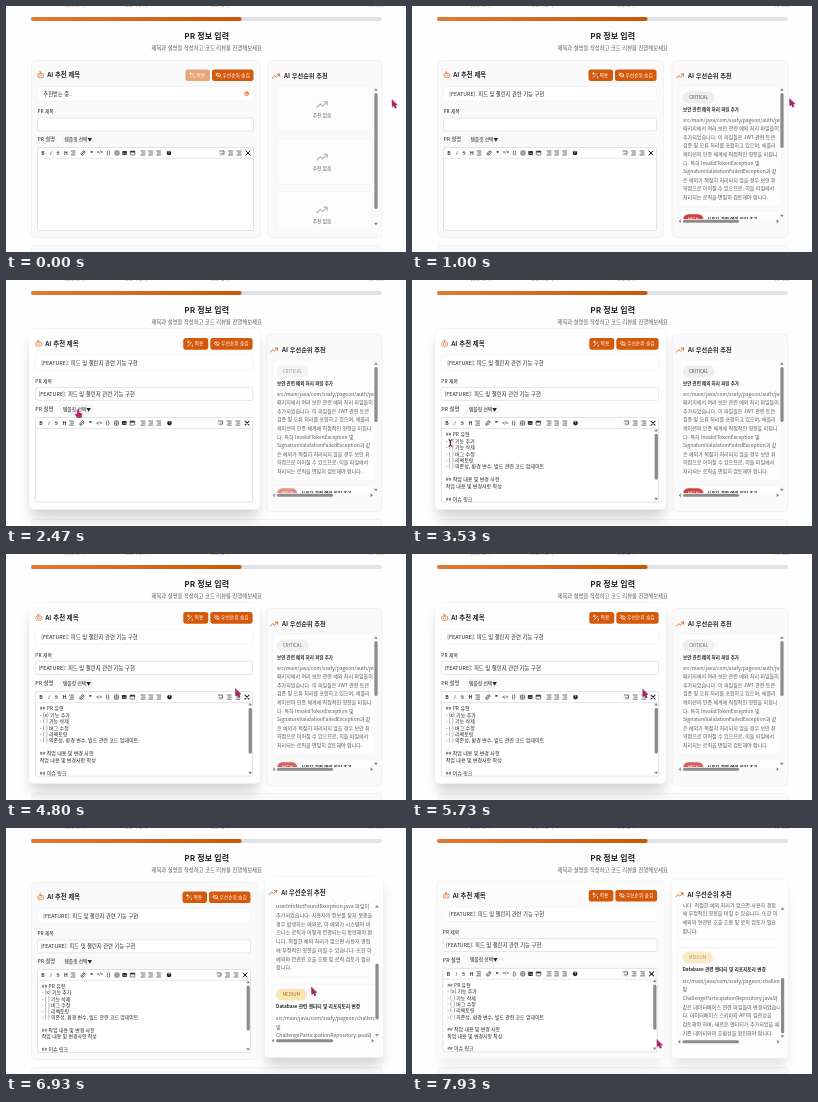
Animation of 400x246 px, one loop 8000 ms. Source, as an HTML page:

```html
<!DOCTYPE html>
<html lang="ko">
<head>
<meta charset="utf-8">
<style>
  html, body { margin: 0; width: 100%; height: 100%; overflow: hidden; background: #fefefe; }
  svg { display: block; width: 400px; height: 246px; }
  text { font-family: "Noto Sans CJK KR", "Noto Sans CJK", "Noto Sans", sans-serif; white-space: pre; }
</style>
</head>
<body>
<svg id="stage" viewBox="0 0 400 246">
  <defs>
    <linearGradient id="progress"><stop stop-color="#e07b32"/><stop offset="1" stop-color="#c9570d"/></linearGradient>
    <filter id="blur" x="-25%" y="-25%" width="150%" height="150%"><feGaussianBlur stdDeviation="6"/></filter>
    <clipPath id="tallView"><rect x="264" y="78" width="103.5" height="143"/></clipPath>
    <clipPath id="shortView"><rect x="264" y="78" width="103.5" height="135"/></clipPath>
  </defs>
</svg>
<script>
const LOOP = 8000, MID_Y = 143;
const LOADED = 600, TITLE_APPLIED = 1830, TEMPLATE_APPLIED = 2500, BOX_CHECKED = 3950;
const ORANGE = '#d4590b', INK = '#27272a', GREY = '#5c5c64', BAR = '#8b8b8b';
const SUGGESTION = '[FEATURE]: 피드 및 챌린지 관련 기능 구현';
const stage = document.getElementById('stage');

function el(parent, tag, attrs = {}) {
  const node = document.createElementNS('http://www.w3.org/2000/svg', tag);
  for (const key in attrs) node.setAttribute(key, attrs[key]);
  return parent.appendChild(node);
}
const group = (parent, attrs) => el(parent, 'g', attrs);
const rect = (parent, x, y, width, height, fill, rx = 0, stroke = 'none') =>
  el(parent, 'rect', { x, y, width, height, fill, rx, stroke, 'stroke-width': .6 });
const path = (parent, d, stroke, width = .8, fill = 'none') =>
  el(parent, 'path', { d, stroke, fill, 'stroke-width': width, 'stroke-linecap': 'round', 'stroke-linejoin': 'round' });
// y is the vertical middle of the glyphs
function text(parent, x, y, size, string, fill = INK, weight = 400, anchor = 'start') {
  const node = el(parent, 'text', { x, y: y + size * .36, 'font-size': size, fill, 'font-weight': weight, 'text-anchor': anchor });
  node.textContent = string;
  return node;
}
const show = (node, visible) => node.setAttribute('display', visible ? 'inline' : 'none');

const clamp = v => Math.max(0, Math.min(1, v));
const smooth = v => { v = clamp(v); return v * v * (3 - 2 * v); };
// keys: [time, value, value...], eased between neighbours
function at(keys, t) {
  const next = keys.findIndex(k => k[0] > t);
  if (next < 0) return keys[keys.length - 1].slice(1);
  if (next === 0) return keys[0].slice(1);
  const a = keys[next - 1], b = keys[next], p = smooth((t - a[0]) / (b[0] - a[0]));
  return a.slice(1).map((v, i) => v + (b[i + 1] - v) * p);
}

function trend(parent, x, y, color, scale) {
  const g = group(parent, { transform: `translate(${x} ${y}) scale(${scale})` });
  path(g, 'M-4 2.2L-1.3 -.4L.5 1.3L4 -2.2M1.5 -2.2H4V.3', color, .9);
}

// Vertical scroll bar between two arrow heads; returns the thumb
function scrollbar(parent, x, top, bottom, thumbLength) {
  path(parent, `M${x - 1.3} ${top}h2.6l-1.3 -1.8zM${x - 1.3} ${bottom}h2.6l-1.3 1.8z`, '#777', .4, '#777');
  return rect(parent, x - 1.6, top + 2.5, 3.2, thumbLength, BAR, 1.6);
}

function card(parent, x, width) {
  const root = group(parent);
  const shadow = rect(root, x + 2, 66, width - 4, 174, '#000', 5);
  shadow.setAttribute('filter', 'url(#blur)');
  rect(root, x, 54.5, width, 177, '#fafafa', 4, '#ededef');
  const lift = rect(root, x, 54.5, width, 177, '#fff', 4);
  return {
    root,
    hover(h) {
      const cx = x + width / 2;
      root.setAttribute('transform', `translate(${cx} ${MID_Y - 4 * h}) scale(${1 + .02 * h}) translate(${-cx} ${-MID_Y})`);
      shadow.setAttribute('opacity', .17 * h);
      lift.setAttribute('opacity', .85 * h);
    }
  };
}

function toolbar(parent, right) {
  const y = 147, dark = '#333';
  [['B', 37, 700], ['I', 44.5, 400], ['S', 52, 400], ['H', 60, 700], ['❞', 85.5, 700], ['</>', 94, 700], ['{}', 102.5, 700]]
    .forEach(([glyph, x, weight]) => {
      const node = text(parent, x, y, glyph === '</>' ? 4 : 5, glyph, dark, weight, 'middle');
      if (glyph === 'I') node.setAttribute('font-style', 'italic');
      if (glyph === 'S') node.setAttribute('text-decoration', 'line-through');
    });
  path(parent, 'M75.5 148.5L78.7 145.3M76.5 145.7L78 144.7L79.3 146L78.4 147.4M77.7 148.4L76 149.4L74.8 148L75.7 146.6', dark, .7);
  for (const x of [67, 137, 144.5, 152.5, right - 23, right - 14.5])
    path(parent, `M${x - 2} 145h4m-3 2h3m-4 2h4`, dark, .7);
  rect(parent, right - 34.5, 144, 6, 6, '#ececec', 1);
  path(parent, `M${right - 33.5} 145h4v3h-3`, dark, .6);
  rect(parent, 109, 145, 4, 4, 'none', .4, dark);
  path(parent, 'M109 147h4m-2 -2v4', dark, .5);
  rect(parent, 116.3, 145, 4.6, 4, dark, .5);
  path(parent, 'M117 148.3l1.2 -1.5l1 1l.7 -.6l.6 1.1', '#fff', .4);
  rect(parent, 124.3, 145, 4.6, 4, 'none', .4, dark);
  rect(parent, 124.3, 145, 4.6, 1.5, dark);
  el(parent, 'circle', { cx: 163, cy: y, r: 2.3, fill: '#222' });
  text(parent, 163, y, 3.6, '?', '#fff', 700, 'middle');
  path(parent, `M${right - 7.5} 145l4 4m0 -4l-4 4`, '#222', 1);
}

function leftCard(width, loaded) {
  const c = card(stage, 25.5, width), g = c.root, right = 25.5 + width - 7, inner = right - 31.5;
  rect(g, 32, 67.6, 5.6, 4, 'none', 1, ORANGE);
  path(g, 'M34.8 67.6v-1.7h-1.2M33.8 69.2v.7M35.8 69.2v.7', ORANGE, .7);
  text(g, 41.2, 69, 6.3, 'AI 추천 제목', INK, 700);

  const apply = rect(g, right - 68, 63.5, 24.5, 11.5, loaded ? ORANGE : '#e7a579', 2.5);
  path(g, `M${right - 63.5} 71.5l3.8 -3.8M${right - 63} 66.5v2m-1 -1h2M${right - 59.2} 70.3v1.6`, '#fff', .7);
  text(g, right - 57, 69.2, 4.7, '적용', '#fff', 500);
  rect(g, right - 41.5, 63.5, 41.5, 11.5, ORANGE, 2.5);
  path(g, `M${right - 37.5} 69q2.5 -3.4 5 0q-2.5 3.4 -5 0M${right - 37.3} 66.7l4.6 4.7`, '#fff', .7);
  text(g, right - 31, 69.2, 4.7, '우선순위 숨김', '#fff', 500);

  rect(g, 31.5, 80.5, inner, 14.5, '#fff', 2.5, '#f1f1f2');
  text(g, 37.3, 87.8, 5.3, loaded ? SUGGESTION : '추천받는 중..');
  let spinner;
  if (!loaded) {
    el(g, 'circle', { cx: 240.5, cy: 87.8, r: 2, fill: '#f3b78c', stroke: '#ee9a62', 'stroke-width': .9 });
    spinner = path(g, 'M240.5 85.8a2 2 0 0 1 2 2', ORANGE, .9);
  }
  text(g, 31.5, 105.7, 4.8, 'PR 제목', INK, 500);
  rect(g, 31.5, 112, inner, 12.8, '#fff', 2, '#d6d9df');
  const title = text(g, 34.5, 118.4, 5.3, SUGGESTION);
  text(g, 31.5, 133.4, 5.2, 'PR 설명', INK, 500);
  rect(g, 55.5, 128, 33, 10.5, '#f7f7f8', 2);
  text(g, 58.5, 133, 4.7, '템플릿 선택▼');

  rect(g, 31.5, 141.5, inner, 83, '#fff', 1, '#cfd3da');
  path(g, `M31.5 152.3H${right}`, '#d6d9df', .6);
  toolbar(g, right);
  const body = group(g);
  scrollbar(body, right - 2.3, 155, 220.5, 45);
  const lines = ['## PR 유형', '- [ ] 기능 추가', '- [ ] 기능 삭제', '- [ ] 버그 수정', '- [ ] 리팩토링',
    '- [ ] 의존성, 환경 변수, 빌드 관련 코드 업데이트', '', '## 작업 내용 및 변경 사항', '작업 내용 및 변경사항 작성', '', '## 이슈 링크']
    .map((line, i) => text(body, 35.8, 158.2 + i * 6.3, 4.9, line));
  return { ...c, apply, title, body, spinner, firstBox: lines[1] };
}

function rightCard(x, loaded) {
  const c = card(stage, x, 376 - x), g = c.root;
  trend(g, x + 8, 70, ORANGE, .9);
  text(g, x + 16, 70, 6.2, 'AI 우선순위 추천', INK, 700);
  const list = group(group(g, { 'clip-path': `url(#${loaded ? 'short' : 'tall'}View)` }));
  const thumb = scrollbar(g, 370, 84.5, loaded ? 209 : 217, loaded ? 55 : 116);
  let pills = [];
  if (loaded) {
    rect(g, 271, 213.8, 56, 3, BAR, 1.5);
    path(g, 'M268.5 214l-1.6 1.3l1.6 1.3zM365 214l1.6 1.3l-1.6 1.3z', '#777', .4, '#777');
    pills = fillReview(list);
  } else {
    for (let i = 0; i < 3; i++) {
      const y = 80 + i * 52.7;
      rect(list, 270.5, y, 96, 46, '#fcfcfc', 3, '#f0f0f1');
      trend(list, 316, y + 18.5, '#b5b5b8', 1.3);
      text(list, 316, y + 29.5, 4.7, '추천 없음', GREY, 400, 'middle');
    }
  }
  return { ...c, list, thumb, pills };
}

function fillReview(list) {
  const pills = [];
  const paragraph = (y, lines) => lines.forEach((line, i) => text(list, 271, y + i * 8.55, 5, line, GREY));
  const pill = (y, width, label, fill, color) => {
    const g = group(list);
    rect(g, 271, y - 5.5, width, 11, fill, 5.5, '#e8e4df');
    text(g, 271 + width / 2, y, 4.5, label, color, 400, 'middle');
    pills.push(g);
  };
  rect(list, 266.5, 80, 130, 121, '#fdfdfd', 3, '#f0f0f1');
  pill(91.5, 31, 'CRITICAL', '#ededef', '#3f3f44');
  text(list, 271, 103.5, 4.5, '보안 관련 예외 처리 파일 추가', INK, 700);
  paragraph(114, ['src/main/java/com/ssafy/pageon/auth/jwt/exception', '패키지에서 여러 보안 관련 예외 처리 파일들이',
    '추가되었습니다. 이 파일들은 JWT 관련 토큰', '검증 및 오류 처리를 포함하고 있으며, 애플리', '케이션의 인증 체계에 직접적인 영향을 미칩니',
    '다. 특히 InvalidTokenException 및', 'SignatureValidationFailedException과 같', '은 예외가 적절히 처리되지 않을 경우 보안 취',
    '약점으로 이어질 수 있으므로, 이들 파일에서', '처리되는 로직을 면밀히 검토해야 합니다.']);

  rect(list, 266.5, 205, 130, 108, '#fdfdfd', 3, '#f0f0f1');
  pill(213.5, 20.5, 'HIGH', '#cf2f2b', '#fff');
  text(list, 295, 213, 4.5, '사용자 관련 예외 파일 추가', INK, 700);
  paragraph(236, ['src/main/java/com/ssafy/pageon/user/exception/', 'userInfoNotFoundException.java 파일이', '추가되었습니다. 사용자의 정보를 찾지 못했을',
    '경우 발생하는 예외로, 이 예외가 시스템의 비', '즈니스 로직과 어떻게 연결되는지 확인해야 합', '니다. 적절한 예외 처리가 없으면 사용자 경험',
    '에 부정적인 영향을 미칠 수 있습니다. 또한 이', '예외와 연관된 호출 흐름 및 로직 검토가 필요', '합니다.']);

  rect(list, 266.5, 321, 130, 91, '#fdfdfd', 3, '#f0f0f1');
  pill(331, 30, 'MEDIUM', '#fae3a4', '#a05a10');
  text(list, 271, 343, 4.6, 'Database 관련 엔티티 및 리포지토리 변경', INK, 700);
  paragraph(354, ['src/main/java/com/ssafy/pageon/challenge/repository', '및', 'ChallengeParticipationRepository.java와', '같은 데이터베이스 관련 파일들이 변경되었습니',
    '다. 데이터베이스 스키마와 API의 일관성을', '검토해야 하며, 새로운 엔티티가 추가되었을 때', '기존 데이터와의 호환성을 확인해야 합니다.']);
  return pills;
}

// Page frame
[['저장소 선택', 67], ['브랜치 선택', 130], ['PR 정보 입력', 210], ['리뷰 요청', 369]]
  .forEach(([label, x], i) => text(stage, x, -1.2, 4.6, label, i < 3 ? '#c9733c' : '#9a9aa2', 400, 'middle'));
rect(stage, 25, 11, 351, 4, '#e1e2e6', 2);
rect(stage, 25, 11, 210.6, 4, 'url(#progress)', 2);
text(stage, 200.7, 29.8, 8, 'PR 정보 입력', '#1f1f23', 700, 'middle');
text(stage, 200.7, 42, 5.33, '제목과 설명을 작성하고 코드 리뷰를 진행해보세요', GREY, 400, 'middle');
rect(stage, 25.5, 239.3, 350.5, 20, '#fafafa', 4, '#ededef');

const waiting = { right: rightCard(262, false), left: leftCard(229, false) };
const ready = { right: rightCard(260, true), left: leftCard(226, true) };

// Pointer shapes, each with its hot spot at 0,0
const pointer = group(stage);
const shapes = {
  arrow: path(pointer, 'M0 0L.3 7L1.9 5.6L3.1 8.2L4.4 7.6L3.2 5.1L5.2 4.9Z', '#5d1038', .5, '#c2186b'),
  hand: path(pointer, 'M-.7 0Q0 -.8 .7 0V2.8L3.2 3.3Q4 3.6 3.8 4.8L3.2 7.5H-.8L-2.8 4.6Q-2.3 3.6 -.7 4.7Z', '#5d1038', .5, '#d11a75'),
  beam: path(pointer, 'M-1.6 -3.2Q0 -3.2 0 -2.2Q0 -3.2 1.6 -3.2M0 -2.2V2.2M-1.6 3.2Q0 3.2 0 2.2Q0 3.2 1.6 3.2', '#5d1038', 1)
};
const POINTER = [[0, 386, 94], [930, 386, 94], [1500, 189.5, 69], [1850, 189.5, 69], [2250, 72, 130], [2550, 72, 130],
  [3200, 38.5, 163], [4350, 38.5, 163], [4800, 229.5, 135], [5700, 229.5, 135], [6080, 296, 165], [6270, 290, 167],
  [6400, 290, 167], [6930, 305.5, 159.5], [7780, 305.5, 162], [7930, 245, 212]];
const SCROLL = [[6330, 0], [6900, 161], [7100, 161], [7500, 199]];
const FADE = 200;
const hovered = (t, from, to) => smooth((t - from) / FADE) - smooth((t - to) / FADE);

function shapeAt(t) {
  if (t > 1380 && t < 1930 || t > 2200 && t < 2600) return 'hand';
  const inEditor = t > 2900 && t < 4500;
  const inReview = t > 6180 && t < 6600;
  return inEditor || inReview ? 'beam' : 'arrow';
}

function draw(t) {
  const loaded = t >= LOADED;
  for (const side of ['left', 'right']) {
    show(waiting[side].root, !loaded);
    show(ready[side].root, loaded);
  }
  waiting.left.hover(0);
  waiting.right.hover(0);
  show(waiting.left.title, false);
  show(waiting.left.body, false);
  waiting.left.spinner.setAttribute('transform', `rotate(${t * .36} 240.5 87.8)`);

  const { left, right } = ready;
  left.hover(hovered(t, 1320, 5800) + smooth((t - 7860) / FADE));
  right.hover(hovered(t, 6140, 7840));
  left.apply.setAttribute('fill', t > 1420 && t < 1930 ? '#b9480a' : ORANGE);
  show(left.title, t >= TITLE_APPLIED);
  show(left.body, t >= TEMPLATE_APPLIED);
  left.firstBox.textContent = `- [${t >= BOX_CHECKED ? 'x' : ' '}] 기능 추가`;

  // Badges pulse once every two seconds
  const pulse = .75 - .25 * Math.cos((t - 270) / 1000 * Math.PI);
  right.pills.forEach(pill => pill.setAttribute('opacity', pulse));

  const [scroll] = at(SCROLL, t);
  right.list.setAttribute('transform', `translate(0 ${-scroll})`);
  right.thumb.setAttribute('y', 87 + scroll / 199 * 65);

  const [x, y] = at(POINTER, t), current = shapeAt(t);
  pointer.setAttribute('transform', `translate(${x} ${y})`);
  for (const name in shapes) show(shapes[name], name === current);
}

const start = performance.now();
function tick() {
  draw((performance.now() - start) % LOOP);
  requestAnimationFrame(tick);
}
tick();
</script>
</body>
</html>
```
